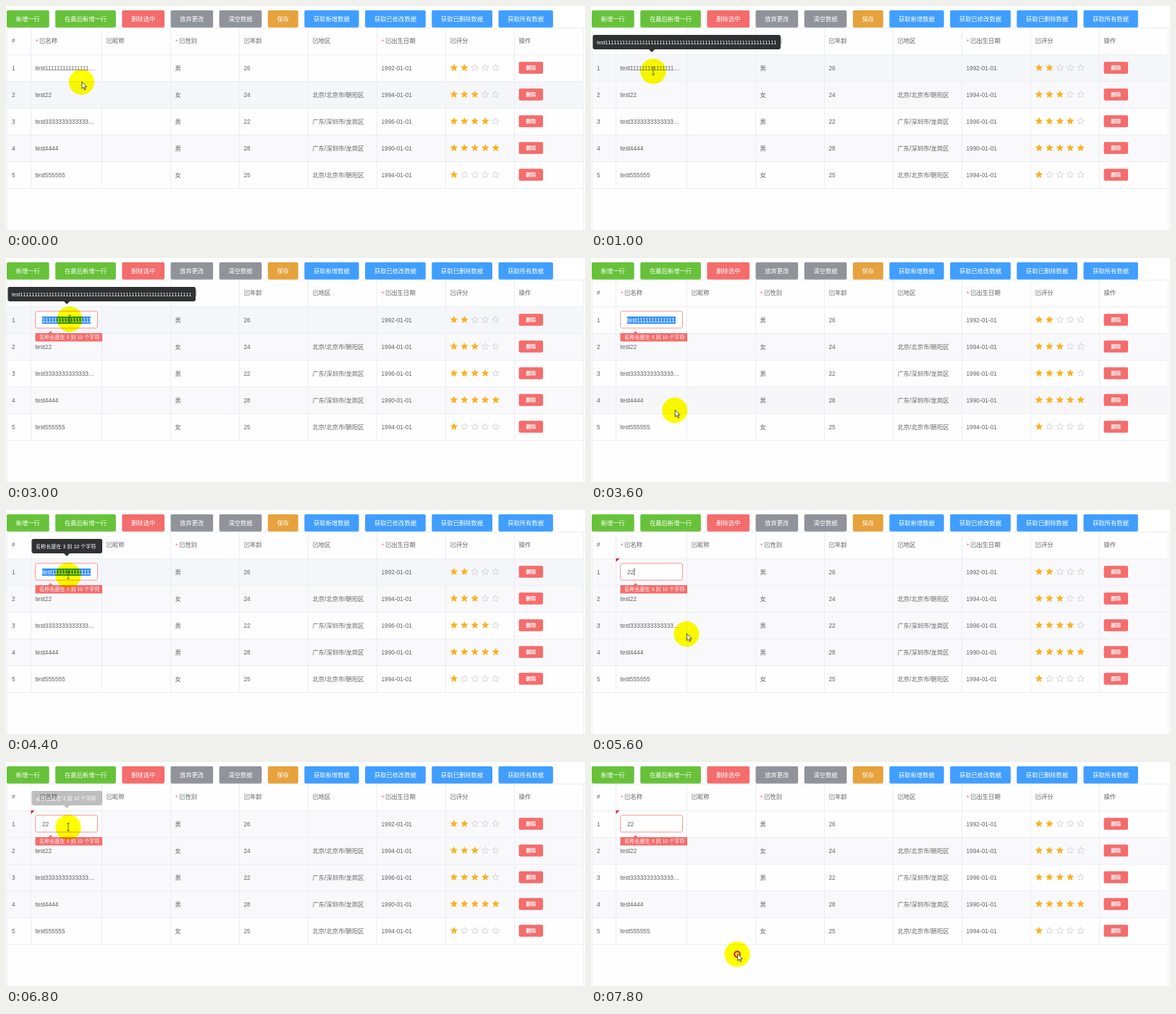
An HTML page that plays this animation: 800 px wide and 310 px high, repeating every 8000 ms.

```html
<!DOCTYPE html>
<html lang="zh-CN">
<head>
<meta charset="utf-8">
<style>
html, body { margin: 0; width: 100%; height: 100%; overflow: hidden; background: #fff; }
svg { display: block; }
text { font: 8.3px "Liberation Sans", Arial, "Noto Sans CJK SC", "Noto Sans CJK", sans-serif; fill: #606266; white-space: pre; }
.btn { fill: #fff; font-weight: 500; text-anchor: middle; }
.small { font-size: 7.1px; font-weight: bold; }
.tip { fill: #fff; font-size: 7.1px; font-weight: 500; font-kerning: none; }
.must { fill: #f56c6c; }
#halo { mix-blend-mode: multiply; }
</style>
</head>
<body>
<svg id="stage" width="800" height="310" viewBox="0 0 800 310"></svg>
<script>
const STEP = 200, LOOP = 8000;
const TOP = 67, ROW = 37;
const GREEN = '#67c23a', RED = '#f56c6c', GRAY = '#909399', ORANGE = '#e6a23c', BLUE = '#409eff', DARK = '#303133';
const RULE = '名称长度在 3 到 10 个字符';
const ones = n => '1'.repeat(n);
const list = (n, f) => Array.from({ length: n }, (_, i) => f(i)).join('');

const rect = (x, y, w, h, fill, extra = '') =>
  `<rect x="${x}" y="${y}" width="${w}" height="${h}" fill="${fill}" ${extra}/>`;
const text = (x, y, s, cls = '', extra = '') => `<text x="${x}" y="${y}" class="${cls}" ${extra}>${s}</text>`;
const line = (x1, y1, x2, y2) => `<path d="M${x1} ${y1}L${x2} ${y2}" stroke="#ebeef5"/>`;

const buttons = [
  [GREEN, '新增一行', '在最后新增一行'], [RED, '删除选中'], [GRAY, '放弃更改', '清空数据'], [ORANGE, '保存'],
  [BLUE, '获取新增数据', '获取已修改数据', '获取已删除数据', '获取所有数据']
];
const heads = ['*名称', '昵称', '*性别', '年龄', '地区', '*出生日期', '评分'];
const beijing = '北京/北京市/朝阳区', guangdong = '广东/深圳市/龙岗区';
const rows = [
  ['test' + ones(15) + '…', '男', 26, '', '1992-01-01', 2],
  ['test22', '女', 24, beijing, '1994-01-01', 3],
  ['test3333333333333…', '男', 22, guangdong, '1996-01-01', 4],
  ['test4444', '男', 28, guangdong, '1990-01-01', 5],
  ['test555555', '女', 25, beijing, '1994-01-01', 1]
];
const columnX = i => i ? 37.5 + 95 * i : 34.5;

// Buttons are as wide as their labels plus padding
function toolbar() {
  let x = 1;
  return buttons.map(([color, ...labels]) => labels.map(s => {
    const w = 8.34 * s.length + 25.3, left = x;
    x += w + 8.5;
    return rect(left, 6, w, 23.8, color, 'rx="1.8"') + text(left + w / 2, 21, s, 'btn');
  }).join('')).join('');
}

function star(cx, cy, full) {
  const pts = Array.from({ length: 10 }, (_, i) => {
    const a = i * Math.PI / 5, r = i % 2 ? 2.2 : 4.8;
    return (cx + r * Math.sin(a)).toFixed(2) + ',' + (cy - r * Math.cos(a)).toFixed(2);
  }).join(' ');
  return `<polygon points="${pts}" stroke-linejoin="round" stroke-width=".7" ` +
    (full ? 'fill="#f9b225" stroke="#f9b225"/>' : 'fill="none" stroke="#c4c8d0"/>');
}

function header(label, i) {
  const left = columnX(i) + 6.5, must = label[0] === '*', x = left + (must ? 5.5 : 0);
  return (must ? text(left, 52, '*', 'must') : '') +
    `<path transform="translate(${x} 44)" d="M4.5 1H.8V7.4H7.2V4M3 5L3.3 3.7 6.6.4 7.6 1.4 4.3 4.7Z" fill="none" stroke="#75787e" stroke-width=".7"/>` +
    text(x + 8, 51, label.replace('*', ''));
}

function row([name, sex, age, area, birth, score], i) {
  const mid = TOP + ROW * (i + .5), y = mid + 3;
  const cell = (c, s) => text(columnX(c) + 6, y, s);
  return text(8, y, i + 1) + `<g id="name${i}">${cell(0, name)}</g>` +
    [sex, age, area, birth].map((s, k) => cell(k + 2, s)).join('') +
    list(5, k => star(619 + k * 14.4, mid, k < score)) +
    rect(708.6, mid - 8.3, 33.4, 16.6, RED, 'rx="1.8"') + text(725.3, y - .4, '删除', 'btn small');
}

const tooltip = (id, x, w, s) => `<g id="${id}">` + rect(x, 40, w, 20, DARK, 'rx="2.4"') +
  `<path d="M80 60h8l-4 4z" fill="${DARK}"/>` + text(x + 5.5, 52.6, s, 'tip') + '</g>';

stage.innerHTML = toolbar() + rect(1, 30, 797, 280, '#fefefe') +
  list(5, i => rect(1, TOP + ROW * i, 797, ROW, i % 2 ? '#f9f9fb' : '#fefefe') +
    rect(1, TOP + ROW * i, 797, ROW, '#f5f6f9', `id="hover${i}"`)) +
  list(7, i => line(1, 30.5 + ROW * i, 798, 30.5 + ROW * i)) +
  list(8, i => line(columnX(i), 30, columnX(i), 252)) + line(1.5, 30, 1.5, 310) + line(797.5, 30, 797.5, 310) +
  text(8, 51, '#') + heads.map(header).join('') + text(708.5, 51, '操作') + rows.map(row).join('') +
  `<path id="mark" d="M34.5 67h5l-5 5z" fill="#c62f35"/>
  <g id="editor">
    ${rect(40.7, 73.8, 85.8, 23.2, '#fff', `rx="2.2" stroke="${RED}" stroke-width=".7"`)}
    <svg x="50" y="78" width="67" height="16">${rect(0, 3, 67, 10, '#3390ff', 'id="selection"')}${text(0, 10.5, '', '', 'id="value"')}</svg>
    <path id="caret" stroke="#333" stroke-width=".8"/>
  </g>
  <g id="error"><path d="M58.5 104l3-3 3 3z" fill="${RED}"/>${rect(40.5, 104, 92.5, 11.5, RED)}${text(46, 112.4, RULE, 'tip')}</g>` +
  tooltip('longTip', 2.5, 259.5, 'test' + ones(60)) + tooltip('ruleTip', 35.5, 97.5, RULE) +
  `<circle id="halo" cy=".5" r="17.6" fill="#ff0"/>
  <g id="pointer">
    <circle id="ring" cy=".5" r="3.8" fill="none" stroke="#d01818" stroke-width="2"/>
    <path id="arrow" d="M.5 0V9.5L2.7 7.5 4.2 11 5.8 10.3 4.3 7H7.2Z" fill="#fff" stroke="#222" stroke-width=".8"/>
    <path id="beam" d="M-2 -5H2M0 -5V5M-2 5H2" fill="none" stroke="#333" stroke-width=".7"/>
  </g>`;

// The pointer rests on the edited cell and swings out and back: start, end, reach x, reach y
const home = { x: 86, y: 90 };
const trips = [
  [-200, 600, 26, 21], [1400, 2200, 10, 15], [2400, 3400, 2, -6],
  [3000, 3800, 42, 170], [5400, 6800, 106, 187], [7000, 8400, 119, 180]
];
function pointerAt(t) {
  let { x, y } = home;
  for (const [from, to, dx, dy] of trips) {
    if (t <= from || t >= to) continue;
    const reach = Math.sin(Math.PI * (t - from) / (to - from));
    x += dx * reach;
    y += dy * reach;
  }
  return { x, y };
}

const rowAt = t => Math.floor((pointerAt(t).y - TOP) / ROW);
// Opacity of something that fades in after one time and is gone by another
const fade = (t, from, to) => Math.min(1, Math.max(0, Math.min(t - from, to - t) / 400)) ** 1.7;
const el = id => document.getElementById(id);
const set = (id, name, v) => el(id).setAttribute(name, v);
const show = (id, on) => set(id, 'visibility', on ? 'visible' : 'hidden');

function draw(t) {
  const { x, y } = pointerAt(t), move = `translate(${x} ${y})`;
  set('halo', 'transform', move);
  set('pointer', 'transform', move);
  const overText = y > 73 && y < 98;
  show('beam', overText);
  show('arrow', !overText);
  show('ring', t >= 7800);

  const now = rowAt(t), before = rowAt(Math.max(0, t - STEP));
  rows.forEach((_, i) => set('hover' + i, 'opacity', ((i === now) + (i === before)) / 2));
  set('longTip', 'opacity', fade(t, 400, 3400));
  set('ruleTip', 'opacity', Math.max(fade(t, 4000, 5600), fade(t, 6600, 7400)));

  const editing = t >= 1400, changed = t >= 4800, selected = t >= 2000 && !changed;
  const value = changed ? '22'.slice(0, (t - 4600) / STEP) : (t < 3200 ? '' : 'test') + ones(30);
  show('name0', !editing);
  show('editor', editing);
  show('error', t >= 1600);
  show('mark', changed);
  show('selection', selected);
  el('value').textContent = value;
  el('value').style.fill = selected ? '#fff' : '#606266';
  set('caret', 'd', `M${Math.min(116.5, 50.6 + 4.62 * value.length)} 80.5v10`);
  show('caret', editing && !selected && t % 1000 < 700);
}

function frame(now) {
  draw(Math.floor(now % LOOP / STEP) * STEP);
  requestAnimationFrame(frame);
}
draw(0);
requestAnimationFrame(frame);
</script>
</body>
</html>
```
